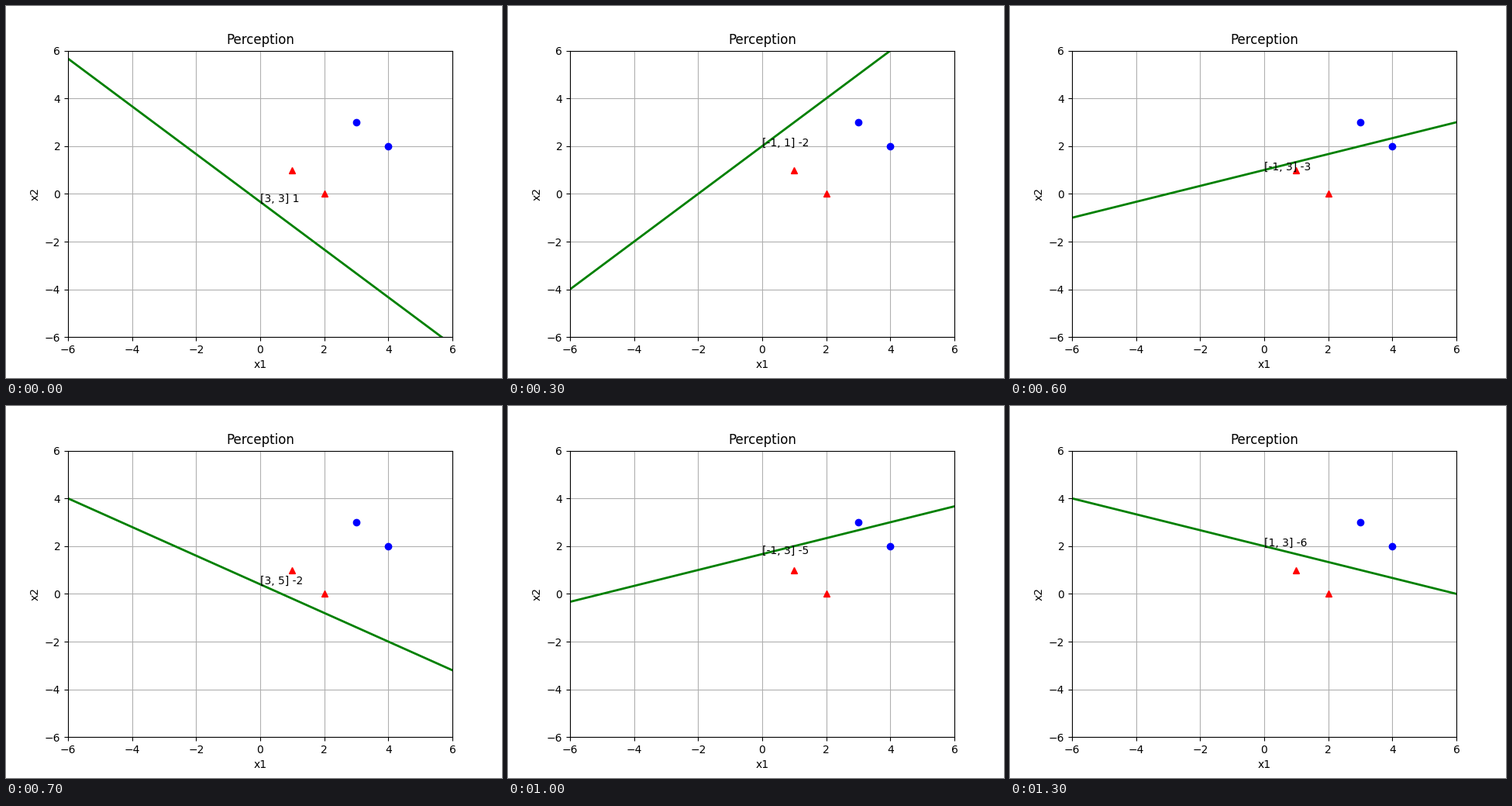
A matplotlib script for the animation above (1400 ms loop, 640x480 px).

```python
import matplotlib.pyplot as plt
from matplotlib.animation import FuncAnimation

POSITIVE = [(3, 3), (4, 2)]
NEGATIVE = [(1, 1), (2, 0)]
SAMPLES = [(p, 1) for p in POSITIVE] + [(p, -1) for p in NEGATIVE]
X_ENDS = (-7, 7)


def train(samples):
    """Return the weights and bias after every perceptron update."""
    w1 = w2 = bias = 0
    history = []
    changed = True
    while changed:
        changed = False
        for (x1, x2), sign in samples:
            if sign * (w1 * x1 + w2 * x2 + bias) <= 0:
                w1 += sign * x1
                w2 += sign * x2
                bias += sign
                history.append((w1, w2, bias))
                changed = True
    return history


history = train(SAMPLES)

plt.rcParams["font.family"] = "DejaVu Sans"
fig, ax = plt.subplots(figsize=(6.4, 4.8), dpi=100)
boundary, = ax.plot([], [], color="green", lw=2)
label = ax.text(0, 0, "")
ax.plot(*zip(*POSITIVE), "bo")
ax.plot(*zip(*NEGATIVE), "r^")
ax.axis([-6, 6, -6, 6])
ax.grid(True)
ax.set_xlabel("x1")
ax.set_ylabel("x2")
ax.set_title("Perception")


def update(step):
    w1, w2, bias = history[step]
    boundary.set_data(X_ENDS, [-(bias + w1 * x) / w2 for x in X_ENDS])
    label.set_position((0, -bias / w2))
    label.set_text(f"[{w1}, {w2}] {bias}")
    return boundary, label


anim = FuncAnimation(fig, update, frames=len(history), interval=100,
                     repeat=True, repeat_delay=0)
plt.show()
```
